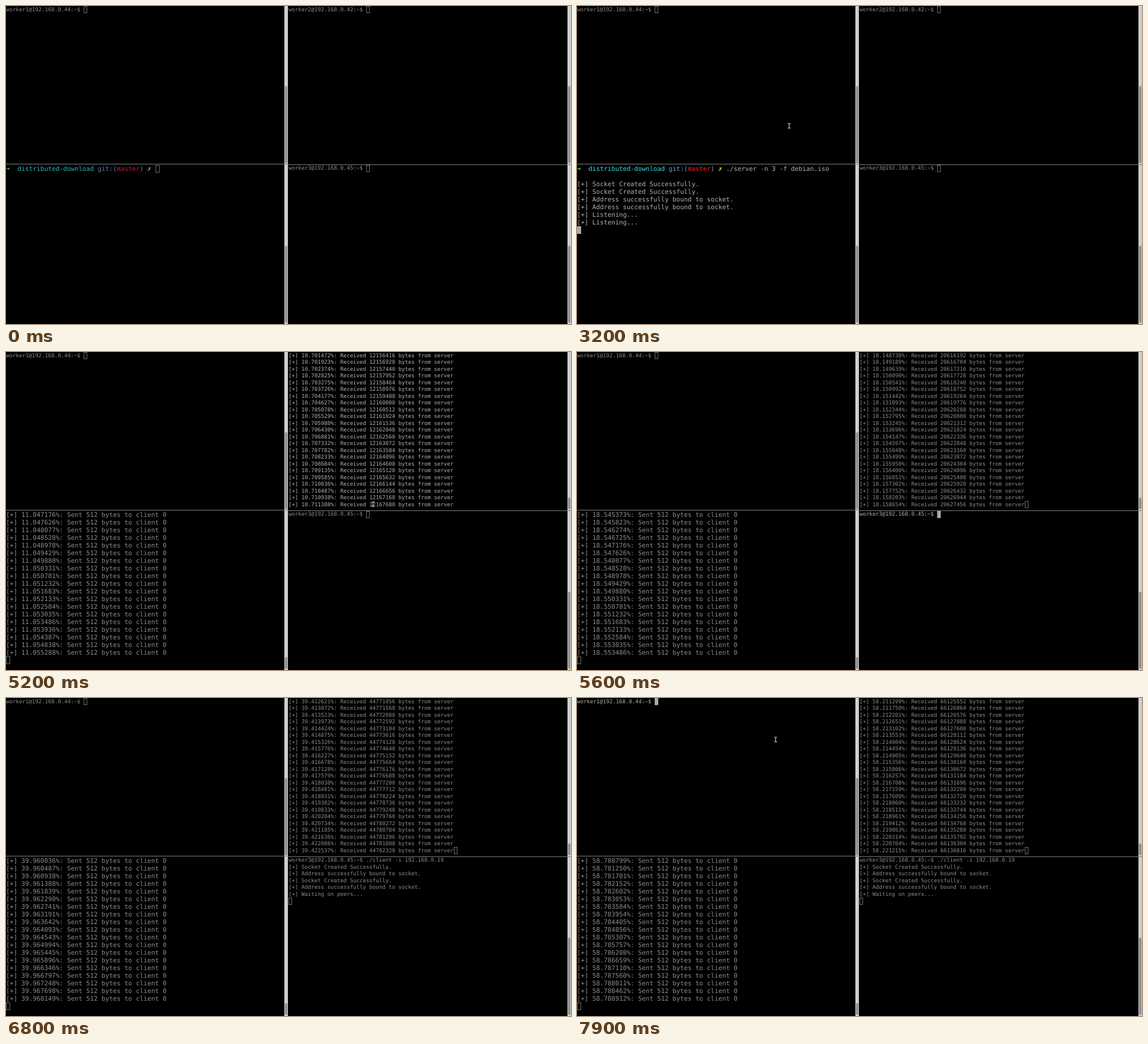
These frames come from a looping animation (960 by 540 pixels, 8000 ms). An HTML page:

```html
<!DOCTYPE html>
<html lang="en">
<head>
<meta charset="utf-8">
<title>Distributed download</title>
<style>
  html, body { margin: 0; width: 100%; height: 100%; overflow: hidden; background: #000; }
  #stage { position: relative; width: 960px; height: 540px; overflow: hidden; background: #000; }
  #stage * { position: absolute; box-sizing: border-box; }

  .term {
    margin: 0; color: #8c8c8c;
    font: 9.1355px/11.5px "DejaVu Sans Mono", monospace;
    text-rendering: geometricPrecision; white-space: pre;
  }
  .big { font-size: 10.796px; line-height: 13px; }
  .focus { color: #b0b0b0; }
  #stage .out { position: relative; top: 1px; }
  #stage .big .out { top: 0; }
  #stage .out span { position: static; }
  .arrow { color: #6eb52a; font-weight: bold; }
  .name { color: #2ab5b5; }
  .git { color: #5b7fa6; }
  .branch { color: #bf2121; }
  .mark { color: #caba3f; font-weight: bold; }
  .focus .arrow { color: #8ae234; }
  .focus .name { color: #34e2e2; }
  .focus .git { color: #729fcf; }
  .focus .branch { color: #ef2929; }
  .focus .mark { color: #fce94f; }

  .cursor { width: 6px; height: 12px; border: 1px solid #6c6c6c; }
  .big .cursor { width: 7px; height: 13px; }
  .focus .cursor { background: #aaa; border-color: #aaa; }

  .bar { top: 0; width: 6px; height: 540px; background: #cfcfcf; }
  .thumb { left: 1px; width: 4px; border-radius: 2px; background: #8e8e8e; }
  .rule { height: 1px; background: #7c7c7c; }
  #mouse { left: 0; top: 0; width: 7px; height: 11px; overflow: visible; }
</style>
</head>
<body>
<div id="stage">
  <div class="bar" style="left:473px"></div>
  <div class="bar" style="left:954px"></div>
  <div class="rule" style="left:0;top:268px;width:479px"></div>
  <div class="rule" style="left:479px;top:269px;width:481px"></div>
  <svg id="mouse" viewBox="0 0 7 11">
    <path d="M1 1.5H2.5L3.5 2.2L4.5 1.5H6M3.5 2.2V8.8M1 9.5H2.5L3.5 8.8L4.5 9.5H6"
      fill="none" stroke="#ccc" stroke-width="1.2"/>
  </svg>
</div>
<script>
const LOOP = 8000, STEP = 100, TOTAL = 113595733, PACKET = 512;
const stage = document.getElementById('stage');
const mouse = document.getElementById('mouse');

function add(parent, cls, tag = 'div') {
  const el = document.createElement(tag);
  el.className = cls;
  parent.insertBefore(el, parent === stage ? mouse : null);
  return el;
}

function makePane(x, y, barX, bottom, big = false) {
  const term = add(stage, big ? 'term big' : 'term', 'pre');
  term.style.left = x + 'px';
  term.style.top = y + 'px';
  const thumb = add(stage, 'thumb');
  thumb.style.left = barX + 1 + 'px';
  return {
    term, thumb, bottom,
    out: add(term, 'out'), cursor: add(term, 'cursor'),
    cw: big ? 6.5 : 5.5, lh: big ? 13 : 11.5
  };
}

const one = makePane(0, 0.5, 473, 267);
const two = makePane(480, 0.5, 954, 267);
const main = makePane(0, 270, 473, 538, true);
const three = makePane(480, 270, 954, 538);

// A null cursor column hides the cursor.
function show(pane, lines, row, col, focus, thumbSize = 131) {
  const html = lines.join('\n');
  if (pane.html !== html) pane.out.innerHTML = pane.html = html;
  pane.term.classList.toggle('focus', focus);
  const c = pane.cursor.style;
  c.display = col === null ? 'none' : 'block';
  c.left = col * pane.cw + 'px';
  c.top = row * pane.lh - 0.5 + 'px';
  pane.thumb.style.height = thumbSize + 'px';
  pane.thumb.style.top = pane.bottom - thumbSize + 'px';
}

// Linear interpolation over [time, value...] rows.
function along(keys, t) {
  const i = keys.findLastIndex(k => k[0] <= t);
  const [t0, ...a] = keys[i];
  const next = keys[i + 1];
  if (!next) return a;
  const k = (t - t0) / (next[0] - t0);
  return a.map((v, j) => v + (next[j + 1] - v) * k);
}

const received = [[4700, 512000], [5200, 12167680], [6100, 31201792],
  [6800, 44782320], [7900, 66136816], [8000, 68078128]];
const sent = [[4700, 1100], [5200, 24528], [6100, 61958],
  [6800, 88676], [7900, 130433], [8000, 134229]];

// Whole packets, counted from the last known byte count.
function bytesAt(t) {
  const base = received.filter(k => k[0] <= t).pop()[1];
  return base + PACKET * Math.round((along(received, t)[0] - base) / PACKET);
}

const percent = bytes => (bytes / TOTAL * 100).toFixed(6) + '%';
const log = (rows, last, line) => Array.from({ length: rows },
  (_, i) => '[+] ' + line(last - (rows - 1 - i) * PACKET));

const prompt = (n, ip) => `worker${n}@192.168.0.${ip}:~$ `;
const zsh = '<span class="arrow">➜</span>  <span class="name">distributed-download</span> ' +
  '<span class="git">git:(</span><span class="branch">master</span><span class="git">)</span> ' +
  '<span class="mark">✗</span> ';
const serverCmd = './server -n 3 -f debian.iso';
const clientCmd = './client -i 192.168.0.19';
const created = '[+] Socket Created Successfully.';
const bound = '[+] Address successfully bound to socket.';
const listening = '[+] Listening...';
const serverOut = ['', created, created, bound, bound, listening, listening];
const clientOut = [created, bound, created, bound, '[+] Waiting on peers...'];

const focusTimes = [[0, null], [600, main], [3800, two], [5500, three], [6500, null], [7600, one]];
const mousePaths = [
  [500, 1900, [[500, 222, 180], [1000, 238, 260], [1800, 240, 249]]],
  [3000, 4600, [[3000, 240, 249], [3600, 600, 110], [4100, 632, 172], [4500, 629, 190]]],
  [4800, 5600, [[4800, 629, 190], [5200, 623, 258], [5500, 630, 330]]],
  [6000, 6600, [[6000, 634, 340], [6200, 634, 340], [6500, 610, 524]]],
  [7500, 8000, [[7500, 390, 8], [7800, 340, 66], [7900, 337, 70]]]
];

function drawMain(t, focus) {
  if (t < 2600) {
    const n = Math.round(Math.min(1, Math.max(0, (t - 1900) / 600)) * serverCmd.length);
    show(main, [zsh + serverCmd.slice(0, n)], 0, 39 + n, focus);
  } else if (t < 4700) {
    show(main, [zsh + serverCmd, ...serverOut], 8, 0, focus);
  } else {
    const last = Math.round(along(sent, t)[0]) * PACKET;
    show(main, log(19, last, b => percent(b) + ': Sent 512 bytes to client 0'), 19, 0, focus, 20);
  }
}

function drawTwo(t, focus) {
  const head = prompt(2, 42);
  if (t < 4600) show(two, [head], 0, head.length, focus);
  else if (t < 4700) show(two, [head + clientCmd, ...clientOut], 6, 0, focus);
  else {
    const lines = log(23, bytesAt(t), b => `${percent(b)}: Received ${b} bytes from server`);
    show(two, lines, 22, focus ? null : 51, focus, 20);
  }
}

function drawThree(t, focus) {
  const head = prompt(3, 45);
  if (t < 5800) show(three, [head], 0, head.length, focus);
  else if (t < 5900) show(three, [head + clientCmd], 0, head.length + clientCmd.length, focus);
  else show(three, [head + clientCmd, ...clientOut], 6, 0, focus);
}

function draw(t) {
  const active = focusTimes.filter(f => f[0] <= t).pop()[1];
  const head = prompt(1, 44);
  show(one, [head], 0, head.length, active === one);
  drawTwo(t, active === two);
  drawMain(t, active === main);
  drawThree(t, active === three);

  const path = mousePaths.find(([from, to]) => t >= from && t < to);
  mouse.style.display = path ? 'block' : 'none';
  if (path) {
    const [x, y] = along(path[2], t);
    mouse.style.transform = `translate(${Math.round(x) - 3}px, ${Math.round(y) - 5}px)`;
  }
}

const start = performance.now();
function tick() {
  const t = (performance.now() - start) % LOOP;
  draw(Math.floor(t / STEP) * STEP);
  requestAnimationFrame(tick);
}
tick();
</script>
</body>
</html>
```
